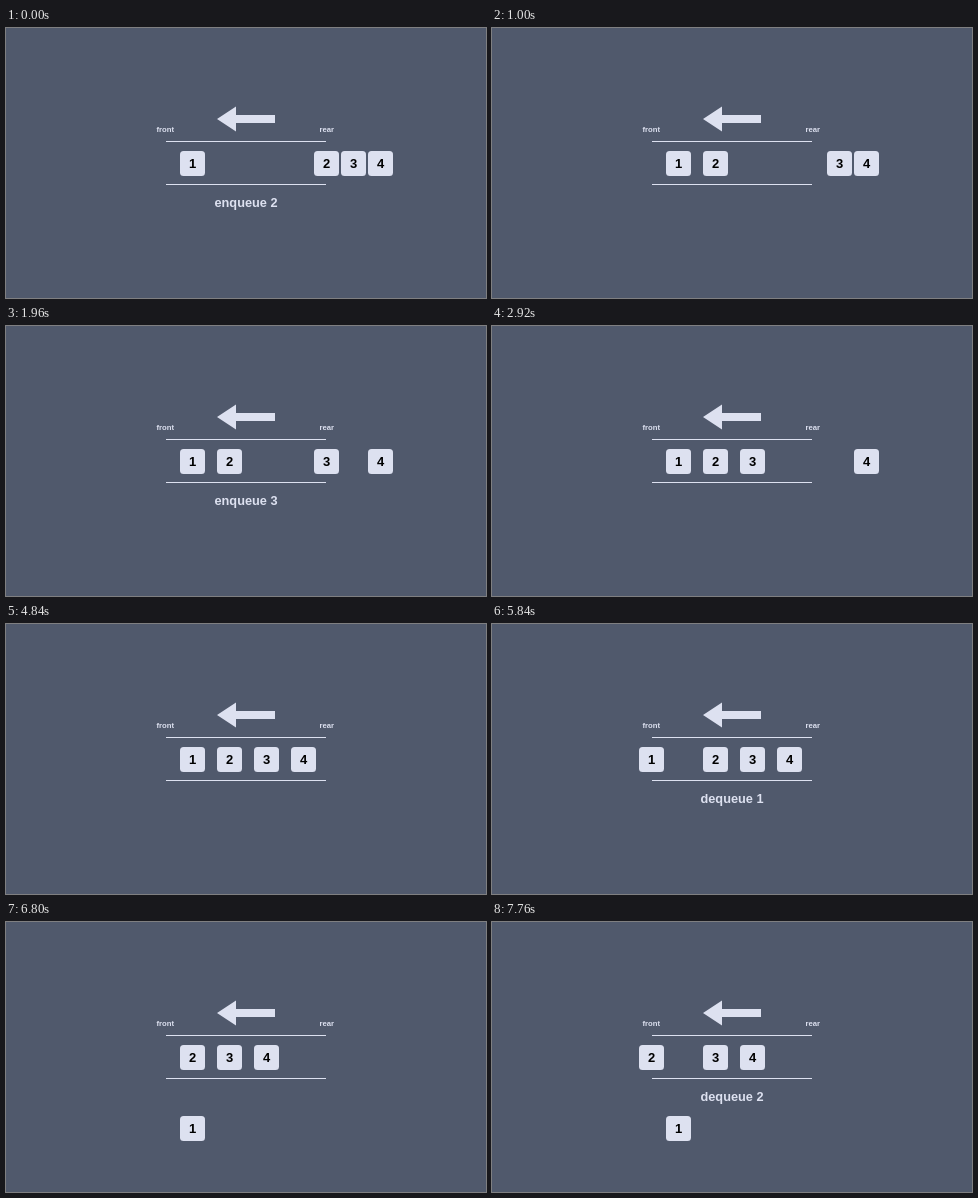
Animation of 480 by 270 pixels, one loop 8000 ms. Source, as an HTML page with a canvas:

```html
<!DOCTYPE html>
<html lang="en">
<head>
<meta charset="utf-8">
<title>Queue</title>
<style>
  html, body { margin: 0; width: 100%; height: 100%; overflow: hidden; background: #50596c; }
  canvas { display: block; width: 480px; height: 270px; }
</style>
</head>
<body>
<canvas id="stage"></canvas>
<script>
const W = 480, H = 270, LOOP = 8000;
const BACK = '#50596c', LIGHT = '#dde1f0';
const FONT = '"Liberation Sans", Helvetica, Arial, sans-serif';
const TILE = 25, ROW = 123, OUT_ROW = 194;

const slot = i => 174 + 37 * i;     // places inside the queue
const waiting = i => 308 + 27 * i;  // places behind the rear
const EXIT = 147;

// Each step holds until the next: start time, caption, x of tiles 1 to 4
const steps = [
  { at: 0,    text: 'enqueue 2', x: [slot(0), waiting(0), waiting(1), waiting(2)] },
  { at: 1000, text: '',          x: [slot(0), slot(1), waiting(1), waiting(2)] },
  { at: 1960, text: 'enqueue 3', x: [slot(0), slot(1), waiting(0), waiting(2)] },
  { at: 2920, text: '',          x: [slot(0), slot(1), slot(2), waiting(2)] },
  { at: 3880, text: 'enqueue 4', x: [slot(0), slot(1), slot(2), waiting(0)] },
  { at: 4840, text: '',          x: [slot(0), slot(1), slot(2), slot(3)] },
  { at: 5840, text: 'dequeue 1', x: [EXIT, slot(1), slot(2), slot(3)] },
  { at: 6800, text: '',          x: [slot(0), slot(0), slot(1), slot(2)], out: 1 },
  { at: 7760, text: 'dequeue 2', x: [slot(0), EXIT, slot(1), slot(2)], out: 1 }
];

const canvas = document.getElementById('stage');
const dpr = window.devicePixelRatio || 1;
canvas.width = W * dpr;
canvas.height = H * dpr;
const ctx = canvas.getContext('2d');
ctx.scale(dpr, dpr);
ctx.textAlign = 'center';

function label(text, x, y, size, color = LIGHT) {
  ctx.font = `bold ${size}px ${FONT}`;
  ctx.fillStyle = color;
  ctx.fillText(text, x, y);
}

function tile(n, x, y) {
  ctx.fillStyle = LIGHT;
  ctx.beginPath();
  ctx.roundRect(x, y, TILE, TILE, 3.5);
  ctx.fill();
  label(n, x + TILE / 2, y + 17, 13, '#000');
}

function arrow() {
  ctx.beginPath();
  ctx.moveTo(211, 91);
  ctx.lineTo(230, 78.5);
  ctx.lineTo(230, 87);
  ctx.lineTo(269, 87);
  ctx.lineTo(269, 95);
  ctx.lineTo(230, 95);
  ctx.lineTo(230, 103.5);
  ctx.fill();
}

function draw(t) {
  const step = steps.filter(s => s.at <= t).pop();
  ctx.fillStyle = BACK;
  ctx.fillRect(0, 0, W, H);

  ctx.fillStyle = LIGHT;
  arrow();
  ctx.fillRect(160, 113, 160, 1);
  ctx.fillRect(160, 156, 160, 1);
  label('front', 159.2, 103.7, 7.7);
  label('rear', 320.8, 103.7, 7.7);

  step.x.forEach((x, i) => tile(i + 1, x, i < (step.out || 0) ? OUT_ROW : ROW));
  label(step.text, 240, 179, 12.75);
}

let start;
function tick(now) {
  start ??= now;
  draw((now - start) % LOOP);
  requestAnimationFrame(tick);
}
draw(0);
requestAnimationFrame(tick);
</script>
</body>
</html>
```
